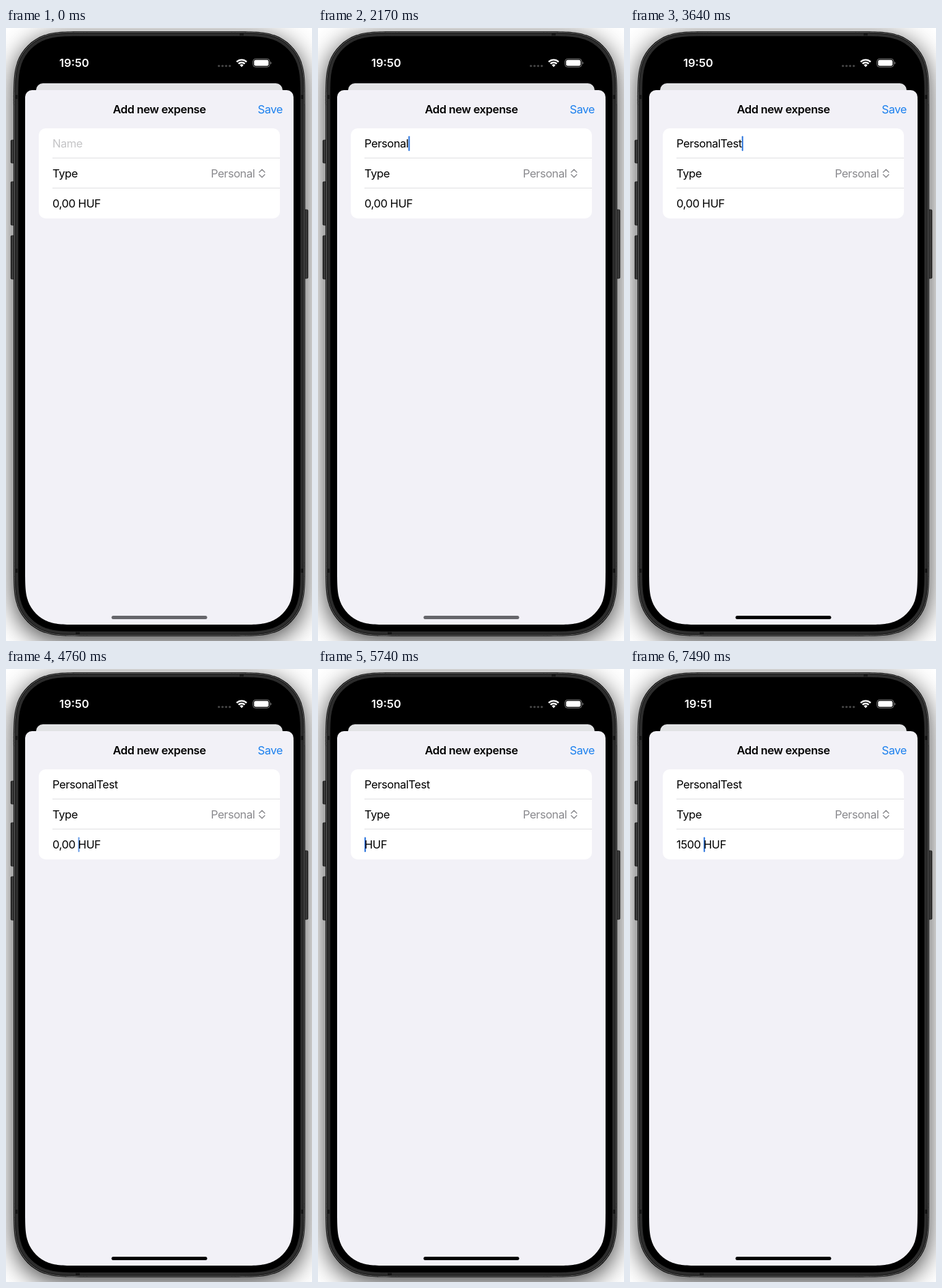
An HTML page that plays this animation: 448 by 898 pixels, repeating every 8 s.

```html
<!DOCTYPE html>
<html lang="en">
<head>
<meta charset="utf-8">
<title>Add new expense</title>
<style>
  html, body { margin: 0; width: 100%; height: 100%; overflow: hidden; background: #fff; }
  svg { display: block; width: 448px; height: 898px; }
  text { font: 400 16.5px Inter, "Open Sans", sans-serif; letter-spacing: -0.44px; fill: #000; }
  .bold { font-weight: 600; letter-spacing: -0.38px; }
  .clock { font-weight: 600; letter-spacing: 0; fill: #fff; text-anchor: middle; }
  .mid { text-anchor: middle; }
  .end { text-anchor: end; }
</style>
</head>
<body>
<svg viewBox="0 0 448 898" xmlns="http://www.w3.org/2000/svg">
  <defs>
    <filter id="soft" filterUnits="userSpaceOnUse" x="-80" y="-80" width="608" height="1058">
      <feGaussianBlur stdDeviation="18"/>
    </filter>
    <clipPath id="screen"><path data-box="28 22 393 852 55"/></clipPath>
    <linearGradient id="steel" x1="0" x2="1" y1="0" y2="0">
      <stop offset="0" stop-color="#1c1c1c"/>
      <stop offset=".5" stop-color="#444"/>
      <stop offset="1" stop-color="#222"/>
    </linearGradient>
  </defs>

  <rect width="448" height="898" fill="#fff"/>
  <path data-box="11 13 427 886 71" fill="#000" opacity=".75" filter="url(#soft)"/>

  <g fill="url(#steel)" stroke="#111" stroke-width=".8">
    <rect x="7.2" y="164.2" width="6" height="33.6" rx="1.2"/>
    <rect x="7.2" y="225.2" width="6" height="63.6" rx="1.2"/>
    <rect x="7.2" y="304.2" width="6" height="63.6" rx="1.2"/>
    <rect x="436" y="266.2" width="6" height="100.6" rx="1.2"/>
  </g>

  <path data-box="11 5 427 886 71" fill="#0c0c0c"/>
  <path data-box="12.5 6.5 424 883 69.5" fill="#2c2c2c" stroke="#6c6c6c"/>
  <path data-box="13.5 7.5 422 881 68.5" fill="none" stroke="#151515"/>
  <g fill="#151515">
    <rect x="342" y="7" width="6" height="5"/>
    <rect x="102" y="884" width="6" height="5"/>
    <rect x="13" y="98" width="5" height="6"/>
    <rect x="431" y="98" width="5" height="6"/>
    <rect x="13" y="792" width="5" height="6"/>
    <rect x="431" y="792" width="5" height="6"/>
  </g>
  <path data-box="17.5 11.5 414 873 65" fill="#000" stroke="#3a3a3a" stroke-width=".6"/>

  <text id="clock" class="clock" x="99.8" y="57.3"></text>
  <g fill="#454545">
    <circle cx="311.7" cy="55.6" r="1.7"/>
    <circle cx="317" cy="55.6" r="1.7"/>
    <circle cx="322.3" cy="55.6" r="1.7"/>
    <circle cx="327.6" cy="55.6" r="1.7"/>
  </g>
  <g transform="translate(345 56.8)" fill="none" stroke="#fff" stroke-width="2.4">
    <path d="M-7.3 -7.1A10.2 10.2 0 0 1 7.3 -7.1"/>
    <path d="M-4.6 -4.4A6.35 6.35 0 0 1 4.6 -4.4"/>
    <path d="M0 .4L-2.7 -2.5A3.8 3.8 0 0 1 2.7 -2.5Z" fill="#fff" stroke="none"/>
  </g>
  <rect x="361.6" y="45.2" width="24.4" height="12" rx="3.8" fill="none" stroke="#7a7a7a"/>
  <rect x="363.2" y="46.8" width="21.2" height="8.8" rx="2.4" fill="#fff"/>
  <path d="M387.2 49.2a2.2 2.2 0 0 1 0 4z" fill="#7a7a7a"/>

  <g clip-path="url(#screen)">
    <rect x="44" y="81" width="361" height="60" rx="10" fill="#e1e2e4"/>
    <rect x="28" y="91" width="393" height="800" rx="10" fill="#f2f1f7"/>
  </g>
  <text class="bold mid" x="224.6" y="125">Add new expense</text>
  <text class="end" x="405" y="125.3" style="fill:#1c80ee">Save</text>

  <rect x="48" y="147" width="353" height="132" rx="10" fill="#fff"/>
  <path d="M68 190.5H401M68 234.5H401" stroke="#dfdfe2"/>
  <rect id="caret" width="2" height="22" rx="1" fill="#2a74dd"/>
  <text id="name" x="68" y="175.3"></text>
  <text x="68" y="219.3">Type</text>
  <text class="end" x="364.3" y="219.3" style="fill:#8a8a8e">Personal</text>
  <path d="M370.8 211.2l4 -4l4 4M370.8 214.8l4 4l4 -4" fill="none" stroke="#8a8a8e"
        stroke-width="1.4" stroke-linecap="round" stroke-linejoin="round"/>
  <text id="amount" x="68" y="263.3"></text>

  <rect id="home" x="154.5" y="861" width="140" height="5" rx="2.5"/>
</svg>
<script>
const LOOP = 8000, LEFT = 68, SPACE = '\u00a0';
const $ = id => document.getElementById(id);

// Rounded box with continuous-curvature corners.
function squircle(x, y, w, h, r) {
  const corner = [[1.5287, 0], [1.0885, 0], [.8684, 0], [.6699, .0655], [.6315, .0749],
    [.3728, .1691], [.1691, .3728], [.0749, .6315], [.0655, .6699], [0, .8684], [0, 1.0885], [0, 1.5287]];
  const side = (right, bottom) => {
    const pts = corner.map(([a, b]) =>
      (right ? x + w - a * r : x + a * r) + ' ' + (bottom ? y + h - b * r : y + b * r));
    if (right === bottom) pts.reverse();
    const p = i => pts[i];
    return `${p(0)}C${p(1)} ${p(2)} ${p(3)}L${p(4)}C${p(5)} ${p(6)} ${p(7)}L${p(8)}C${p(9)} ${p(10)} ${p(11)}`;
  };
  return `M${side(false, false)}L${side(true, false)}L${side(true, true)}L${side(false, true)}Z`;
}
for (const el of document.querySelectorAll('[data-box]'))
  el.setAttribute('d', squircle(...el.dataset.box.split(' ').map(Number)));

// Each key press: [time, field content]
const full = 'PersonalTest';
const nameKeys = [910, 1050, 1120, 1330, 1470, 1890, 2030, 2170, 2520, 2660, 2940, 3080]
  .map((t, i) => [t, full.slice(0, i + 1)]);
const start = '0,00' + SPACE;
const amountKeys = [
  ...[5040, 5180, 5390, 5600, 5740].map((t, i) => [t, start.slice(0, 4 - i)]),
  ...[6370, 6510, 6720, 6930].map((t, i) => [t, '1500'.slice(0, i + 1)]),
  [7490, '1500' + SPACE]
];
const caretFade = [[0, 0], [70, 1], [700, .7], [770, .35], [840, 0], [910, 1],
  [4760, .7], [4830, .35], [4900, 0], [5040, 1]];

const at = (keys, t, first) => keys.reduce((v, [k, next]) => t >= k ? next : v, first);

function setText(el, s) {
  if (el.textContent !== s) el.textContent = s;
}

function draw(t) {
  const name = at(nameKeys, t, ''), amount = at(amountKeys, t, start);
  setText($('clock'), t < 6510 ? '19:50' : '19:51');
  setText($('name'), name || 'Name');
  $('name').style.fill = name ? '#000' : '#c5c5c7';
  setText($('amount'), amount + 'HUF');

  const onAmount = t >= 4130;
  const field = $(onAmount ? 'amount' : 'name');
  const count = (onAmount ? amount : name).length;
  const caret = $('caret');
  caret.setAttribute('x', LEFT + (count ? field.getSubStringLength(0, count) : 0));
  caret.setAttribute('y', onAmount ? 246.2 : 158.2);
  caret.setAttribute('opacity', at(caretFade, t, 0));

  $('home').setAttribute('fill', t < 3640 ? '#66666b' : '#000');
}

function tick() {
  draw(performance.now() % LOOP);
  requestAnimationFrame(tick);
}
tick();
</script>
</body>
</html>
```
